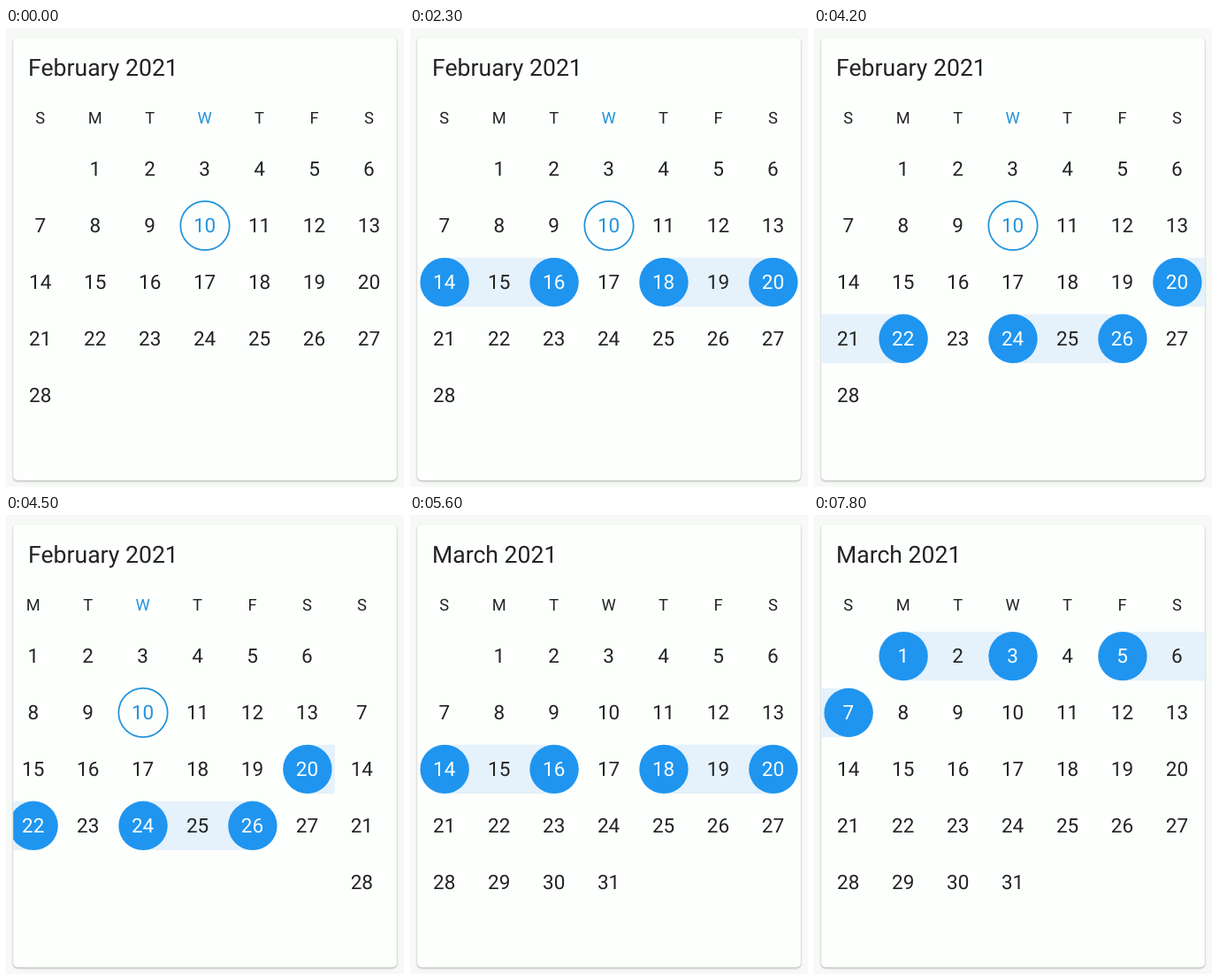
These frames come from a looping animation (450 by 519 pixels, 9000 ms). An HTML page:

```html
<!DOCTYPE html>
<html lang="en">
<head>
<meta charset="utf-8">
<title>Calendar range picker</title>
<style>
  html, body { margin: 0; width: 100%; height: 100%; overflow: hidden; background: #f7f9f7; }
  svg { display: block; width: 450px; height: 519px; font-family: Roboto, sans-serif; }
  text { fill: #222423; text-rendering: geometricPrecision; }
  .title { font-size: 26.6px; }
  .head { font-size: 18.3px; text-anchor: middle; }
  .day { font-size: 22.5px; text-anchor: middle; }
  .today { fill: #2394dc; }
  .on { fill: #fdfffd; }
  .band { fill: #e5f1fb; }
  .dot { fill: #1f95f0; }
  .ring { fill: none; stroke: #2394dc; stroke-width: 1.8; }
  .card { fill: #fdfffd; filter: drop-shadow(0 1px 1.3px rgba(0, 0, 0, .32)); }
</style>
</head>
<body>
<svg viewBox="0 0 450 519">
  <defs><clipPath id="clip"><rect x="8.2" y="11" width="433.6" height="500.5" rx="5"/></clipPath></defs>
  <rect class="card" x="8.2" y="11" width="433.6" height="500.5" rx="5"/>
  <text class="title" id="title" x="25" y="53.6"></text>
  <g clip-path="url(#clip)"><g id="pages"></g></g>
</svg>
<script>
const LOOP = 9000, TICK = 100;
const LEFT = 8.2, WIDTH = 433.6, CELL = WIDTH / 7;
const TOP = 159.6, ROW = 63.9, RADIUS = 27.7;
const TODAY = 10;
const MONTHS = [{ name: 'February 2021', days: 28 }, { name: 'March 2021', days: 31 }];

// [start ms, month, first selected day]
const PICKS = [
  [900, 0, 14], [2400, 0, 9], [3600, 0, 20],
  [5600, 1, 14], [6600, 1, 21], [7700, 1, 1]
];
// [start ms, scroll distance]
const SWIPE = [[4500, 70], [4600, 300], [4700, 410.6], [4800, 430], [4900, WIDTH]];

// Both months begin on a Monday.
const rowOf = d => Math.floor(d / 7);
const cx = d => LEFT + (d % 7 + .5) * CELL;
const cy = d => TOP + rowOf(d) * ROW;
const label = (cls, x, y, s) => `<text class="${cls}" x="${x - .4}" y="${y}">${s}</text>`;
const circle = (cls, d, r) => `<circle class="${cls}" cx="${cx(d)}" cy="${cy(d)}" r="${r}"/>`;

function band([from, to]) {
  let out = '';
  for (let r = rowOf(from); r <= rowOf(to); r++) {
    const x1 = r === rowOf(from) ? cx(from) : LEFT;
    const x2 = r === rowOf(to) ? cx(to) : LEFT + WIDTH;
    out += `<rect class="band" x="${x1}" y="${TOP + r * ROW - RADIUS}" width="${x2 - x1}" height="${2 * RADIUS}"/>`;
  }
  return out;
}

function page(month, first) {
  const ranges = first ? [[first, first + 2], [first + 4, first + 6]] : [];
  const ends = ranges.flat();
  const inRange = d => ranges.some(([a, b]) => d >= a && d <= b);
  const isToday = d => month === 0 && d === TODAY && !inRange(d);

  let out = [...'SMTWTFS'].map((s, i) =>
    label(month === 0 && i === TODAY % 7 ? 'head today' : 'head', cx(i), 108.3, s)).join('');
  out += ranges.map(band).join('') + ends.map(d => circle('dot', d, RADIUS)).join('');
  for (let d = 1; d <= MONTHS[month].days; d++) {
    if (isToday(d)) out += circle('ring', d, RADIUS);
    const tone = ends.includes(d) ? ' on' : isToday(d) ? ' today' : '';
    out += label('day' + tone, cx(d), cy(d) + 7.7, d);
  }
  return `<g transform="translate(${month * WIDTH})">${out}</g>`;
}

const lastBefore = (steps, t) => steps.filter(s => s[0] <= t).pop();
const title = document.getElementById('title');
const pages = document.getElementById('pages');
let shown = '';

function draw(t) {
  const firsts = MONTHS.map((_, m) => (lastBefore(PICKS.filter(p => p[1] === m), t) || [])[2] || 0);
  const scroll = (lastBefore(SWIPE, t) || [0, 0])[1];
  const key = firsts + '/' + scroll;
  if (key === shown) return;
  shown = key;
  title.textContent = MONTHS[Math.round(scroll / WIDTH)].name;
  pages.innerHTML = firsts.map((f, m) => page(m, f)).join('');
  pages.setAttribute('transform', `translate(${-scroll})`);
}

const start = performance.now();
function frame() {
  const t = (performance.now() - start) % LOOP;
  draw(Math.floor(t / TICK) * TICK);
  requestAnimationFrame(frame);
}
frame();
</script>
</body>
</html>
```
